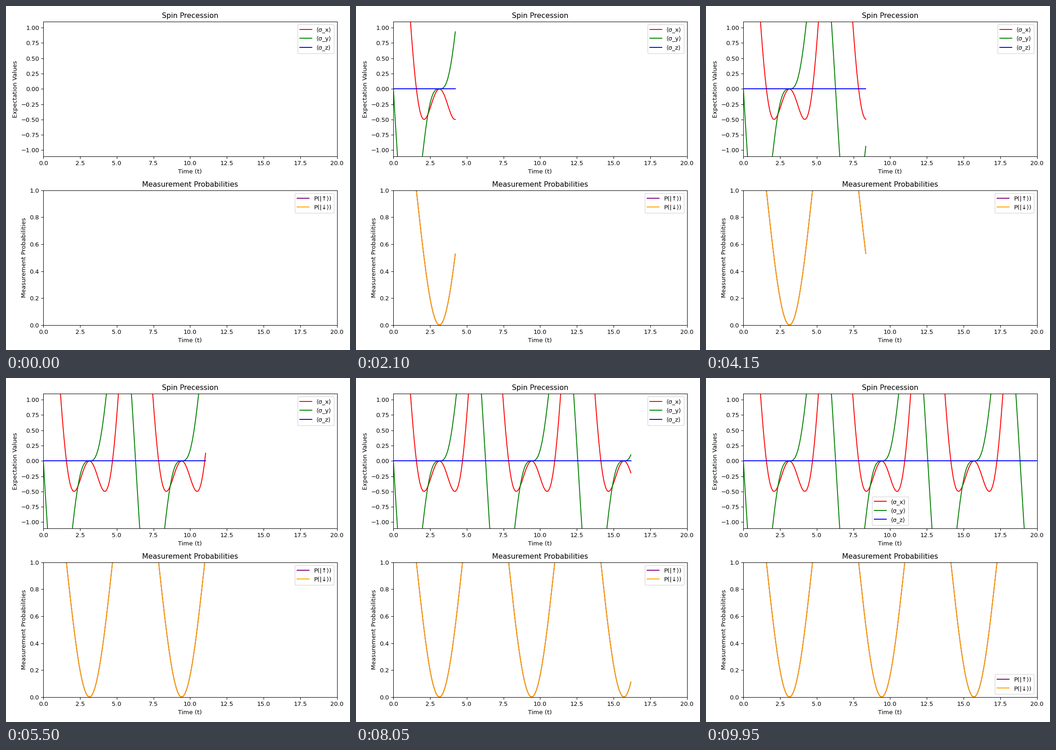
These frames come from a looping animation (748x748 px, 10 s). A matplotlib script:

```python
import numpy as np
import matplotlib.pyplot as plt
from matplotlib.animation import FuncAnimation

FRAMES = 200
INTERVAL = 50

t = np.linspace(0, 20, FRAMES)
swing = 1 + np.cos(t)

fig, (ax_spin, ax_prob) = plt.subplots(2, 1, figsize=(8, 8), dpi=93.5)


def setup(ax, title, ylabel, ylim, curves):
    """Style one panel and return its (line, values) pairs."""
    ax.set_xlim(0, 20)
    ax.set_ylim(*ylim)
    ax.set_title(title)
    ax.set_xlabel("Time (t)")
    ax.set_ylabel(ylabel)
    pairs = [(ax.plot([], [], color=color, label=label)[0], values)
             for label, color, values in curves]
    # "best" lets the legend move away as the curves reach it
    ax.legend(loc="best")
    return pairs


traces = setup(ax_spin, "Spin Precession", "Expectation Values", (-1.1, 1.1), [
    ("⟨σ_x⟩", "red", 2 * np.cos(t) * swing),
    ("⟨σ_y⟩", "green", -2 * np.sin(t) * swing),
    ("⟨σ_z⟩", "blue", np.zeros_like(t)),
])
traces += setup(ax_prob, "Measurement Probabilities",
                "Measurement Probabilities", (0, 1), [
    ("P(|↑⟩)", "purple", swing),
    ("P(|↓⟩)", "orange", swing),
])
fig.tight_layout()


def show(count):
    for line, values in traces:
        line.set_data(t[:count], values[:count])
    return [line for line, _ in traces]


def init():
    return show(0)


def update(frame):
    return show(frame + 1)


anim = FuncAnimation(fig, update, frames=FRAMES, init_func=init,
                     interval=INTERVAL, repeat=True, repeat_delay=0)
plt.show()
```
